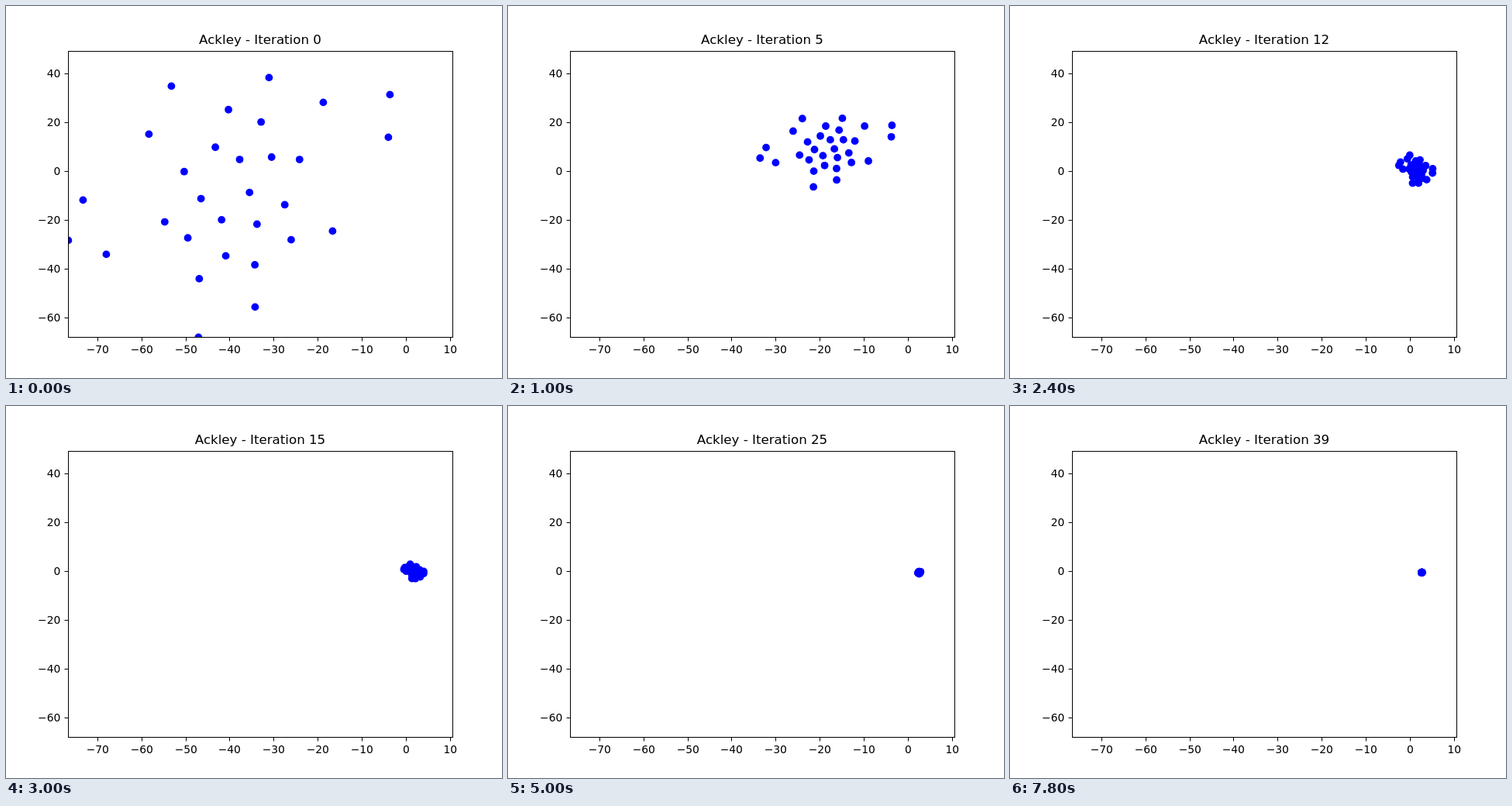
An HTML page for the animation above (8 s loop, 640 by 480 pixels).

```html
<!DOCTYPE html>
<html lang="en">
<head>
<meta charset="utf-8">
<title>Ackley swarm</title>
<style>
  html, body { margin: 0; width: 100%; height: 100%; overflow: hidden; background: #fff; }
  svg { display: block; width: 640px; height: 480px; }
  text { font: 13.89px "DejaVu Sans", sans-serif; fill: #000; }
  #title { font-size: 16.67px; }
  .line { fill: none; stroke: #000; stroke-width: 1; }
</style>
</head>
<body>
<svg viewBox="0 0 640 480">
  <clipPath id="plot"><rect x="80" y="58" width="496" height="369.5"/></clipPath>
  <g id="dots" fill="#00f" clip-path="url(#plot)"></g>
  <rect class="line" x="80.5" y="58.5" width="496" height="369"/>
  <g id="axes"></g>
  <text id="title" x="328" y="49" text-anchor="middle"></text>
</svg>
<script>
const STEP = 200, COUNT = 40;
const $ = id => document.getElementById(id);

function add(parent, tag, attrs, text = '') {
  const el = document.createElementNS('http://www.w3.org/2000/svg', tag);
  for (const k in attrs) el.setAttribute(k, attrs[k]);
  el.textContent = text;
  return parent.appendChild(el);
}

const label = v => String(v).replace('-', '\u2212');
for (let v = -70; v <= 10; v += 10) {
  const x = Math.floor(516.4 + v * 5.686);
  add($('axes'), 'path', { class: 'line', d: `M${x + .5} 428v4.5` });
  add($('axes'), 'text', { x: x + .3, y: 448, 'text-anchor': 'middle' }, label(v));
}
for (let v = -60; v <= 40; v += 20) {
  const y = Math.round(213 - v * 3.157);
  add($('axes'), 'path', { class: 'line', d: `M80 ${y + .5}h-4.5` });
  add($('axes'), 'text', { x: 70.3, y: y + 5, 'text-anchor': 'end' }, label(v));
}

// The swarm: a hand-placed rim around a tilted golden-angle spiral
const rim = [
  [213, 103], [339, 92], [409, 124], [495, 114], [493, 169], [421, 290],
  [321, 388], [248, 427], [129, 320], [80, 302], [99, 250], [184, 165]];
const INNER = 18;
const inner = Array.from({ length: INNER }, (_, i) => {
  const r = Math.sqrt((i + .5) / INNER), a = i * 2.39996;
  const dx = 95 * r * Math.cos(a);
  return [298 + dx, 245 + 125 * r * Math.sin(a) - .3 * dx];
});
const start = { x: 295, y: 238 };
const particles = [...rim, ...inner].map(([x, y]) => [x - start.x, y - start.y]);

// The swarm's centre, scale and shear at key iterations
const poses = [
  { at: 0, ...start, sx: 1, sy: 1, shear: 0 },
  { at: 5, x: 413, y: 183, sx: .41, sy: .27, shear: .05 },
  { at: 9, x: 512, y: 199, sx: .29, sy: .15, shear: .25 },
  { at: 12, x: 524, y: 211, sx: .105, sy: .105, shear: .55 },
  { at: 18, x: 528.5, y: 216, sx: .036, sy: .027, shear: .45 },
  { at: 25, x: 530.3, y: 214.5, sx: .008, sy: .009, shear: 0 },
  { at: 39, x: 531, y: 214.5, sx: .002, sy: .002, shear: 0 }];

const mix = (a, b, u) => a + (b - a) * u;
const decay = (a, b, u) => a * (b / a) ** u;

function poseAt(n) {
  const i = Math.max(1, poses.findIndex(p => p.at >= n));
  const a = poses[i - 1], b = poses[i], u = (n - a.at) / (b.at - a.at);
  const pose = {};
  for (const k of ['x', 'y', 'shear']) pose[k] = mix(a[k], b[k], u);
  for (const k of ['sx', 'sy']) pose[k] = decay(a[k], b[k], u);
  return pose;
}

const dots = particles.map(() => add($('dots'), 'circle', { r: 4.9 }));
let shown = -1;

function draw(t) {
  const n = Math.floor((t + 1) / STEP) % COUNT;
  if (n === shown) return;
  shown = n;
  const p = poseAt(n);
  particles.forEach(([px, py], i) => {
    const dx = px * p.sx;
    dots[i].setAttribute('cx', p.x + dx + .4);
    dots[i].setAttribute('cy', p.y + py * p.sy + dx * p.shear + .4);
  });
  $('title').textContent = `Ackley - Iteration ${n}`;
}

function tick(t) {
  draw(t);
  requestAnimationFrame(tick);
}
draw(0);
requestAnimationFrame(tick);
</script>
</body>
</html>
```
